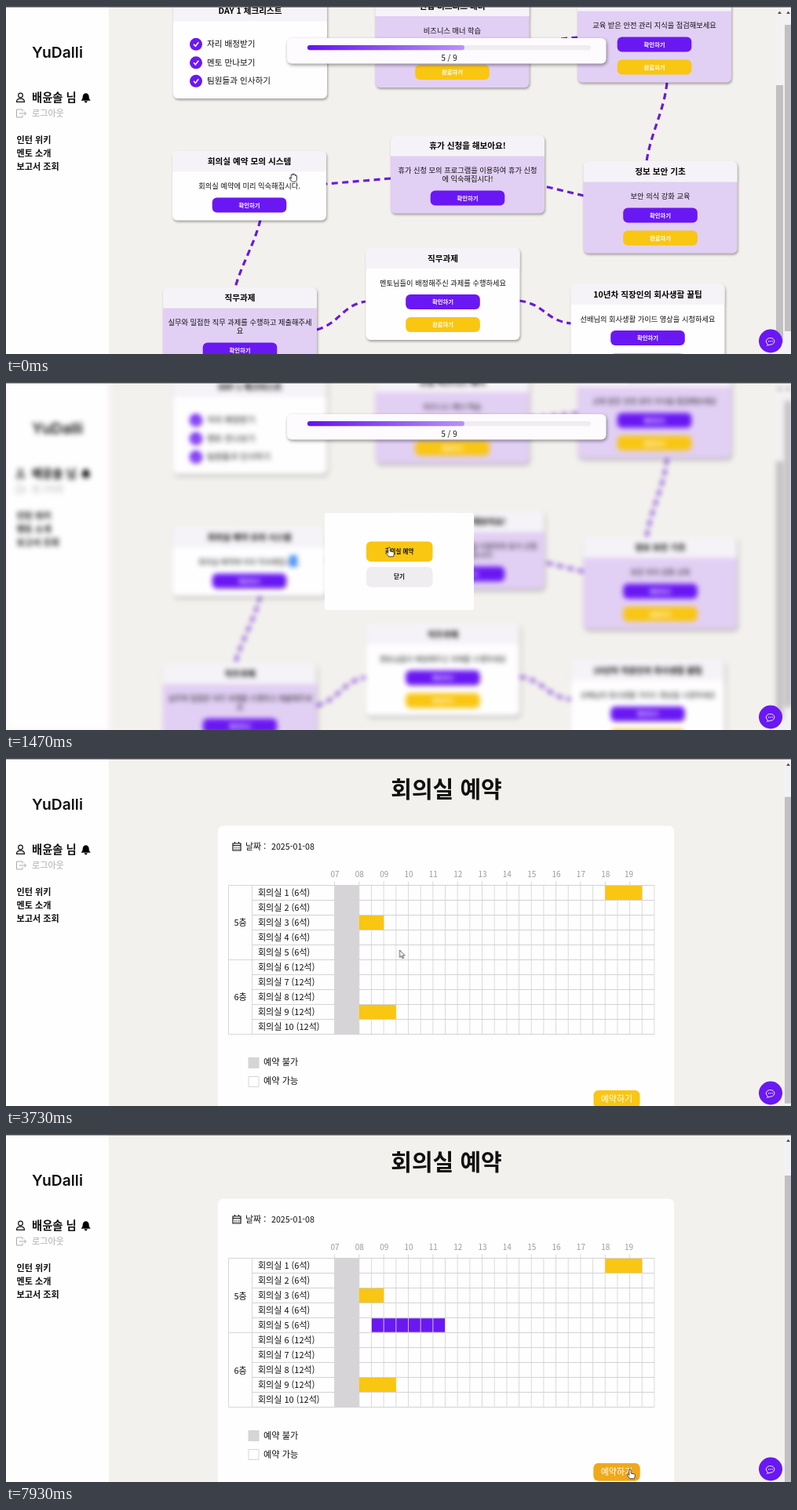
An HTML page that plays this animation: 1000 px wide and 444 px high, repeating every 8000 ms.

```html
<!DOCTYPE html>
<html lang="ko">
<head>
<meta charset="utf-8">
<title>회의실 예약</title>
<style>
html, body { margin: 0; width: 100%; height: 100%; overflow: hidden; background: #f3f1ed; }
svg { display: block; width: 100%; height: 100%; font-family: "Noto Sans CJK KR", "Noto Sans KR", sans-serif; }
.logo { font-family: Inter, sans-serif; }
.card { filter: drop-shadow(1px 2px 1.5px #0005); }
.panel { filter: drop-shadow(1px 2px 2px #0006); }
.calendar text { font-family: "Noto Sans", sans-serif; }

.step { animation: 8s step-end infinite; }
.home { animation-name: home; }
.booking { animation-name: booking; }
.blurred { animation-name: blurred; }
.modal { animation-name: modal; }
.press { animation-name: press; }
.hint { animation-name: hint; }
.date { animation-name: date; }
.day { animation-name: day; }
.hover { animation-name: hover; }
.grab { animation-name: grab; }
.hand { animation-name: hand; }
.arrow { animation-name: arrow; }
.scroll { animation: scroll 8s linear infinite; }
.thumb { animation: thumb 8s linear infinite; }
.calendar { animation: calendar 8s linear infinite; }
.picked { transform-origin: 465.5px 0; animation: picked 8s step-end infinite; }
.cursor { animation: cursor 8s ease-in-out infinite; }

@keyframes home { 0% { visibility: visible } 20%, to { visibility: hidden } }
@keyframes booking { 0% { visibility: hidden } 20%, to { visibility: visible } }
@keyframes blurred { 0% { filter: none } 7.5%, to { filter: blur(3px) } }
@keyframes modal { 0%, 20%, to { visibility: hidden } 7.5% { visibility: visible } }
@keyframes press { 0%, 13%, to { visibility: hidden } 5% { visibility: visible } }
@keyframes hint { 0%, 40%, to { visibility: hidden } 20% { visibility: visible } }
@keyframes date { 0% { visibility: hidden } 40%, to { visibility: visible } }
@keyframes day { 0%, 40%, to { visibility: hidden } 34% { visibility: visible } }
@keyframes hover { 0% { visibility: hidden } 90%, to { visibility: visible } }
@keyframes grab { 0%, 9.75% { visibility: visible } 5%, 14.4%, to { visibility: hidden } }
@keyframes hand {
  0%, 9.75%, 20%, 41%, 86.5% { visibility: hidden }
  5%, 14.4%, 32.5%, 49.5%, 89.5%, to { visibility: visible }
}
@keyframes arrow {
  0%, 32.5%, 49.5%, 89.5%, to { visibility: hidden }
  20%, 41%, 86.5% { visibility: visible }
}
@keyframes scroll {
  0%, 44.375% { transform: none; animation-timing-function: cubic-bezier(.33, 1, .68, 1) }
  48.75%, to { transform: translateY(-34.5px) }
}
@keyframes thumb {
  0%, 44.375% { transform: none; animation-timing-function: cubic-bezier(.33, 1, .68, 1) }
  48.75%, to { transform: translateY(29px) }
}
@keyframes calendar {
  0%, 28.125% { opacity: 0; transform: translateY(-16px); animation-timing-function: cubic-bezier(.23, 1, .32, 1) }
  31.875% { opacity: 1; transform: translateY(4px) }
  39.99% { opacity: 1; transform: translateY(4px); animation-timing-function: step-end }
  40%, to { opacity: 0; transform: translateY(4px) }
}
@keyframes picked {
  0% { transform: scaleX(0) }
  70% { transform: scaleX(.16667); animation-timing-function: steps(5, end) }
  76.875%, to { transform: none }
}
@keyframes cursor {
  0%, 1% { transform: translate(366px, 219px) }
  5%, 8% { transform: translate(322px, 251px) }
  11.625% { transform: translate(401px, 237px) }
  16%, 20.5% { transform: translate(488px, 211px) }
  27%, 30.5% { transform: translate(376px, 138px) }
  36%, 40.5% { transform: translate(432px, 228px) }
  44%, 56% { transform: translate(501.5px, 245px) }
  61% { transform: translate(537px, 242px) }
  67.5% { transform: translate(480.5px, 244px) }
  70% { transform: translate(473px, 244px); animation-timing-function: linear }
  76.875%, 80% { transform: translate(551px, 244px) }
  86.5% { transform: translate(757px, 376px) }
  90.5%, to { transform: translate(795px, 428px) }
}
</style>
</head>
<body>
<svg id="stage" viewBox="0 0 1000 444" preserveAspectRatio="none"></svg>
<script>
const PURPLE = '#6a18f3', YELLOW = '#f9c612', LINE = '#d9d6d9';
const range = n => [...Array(n).keys()];
const rect = (x, y, w, h, fill, r = 0, attrs = '') =>
  `<rect x="${x}" y="${y}" width="${w}" height="${h}" rx="${r}" fill="${fill}" ${attrs}/>`;
const text = (x, y, s, size, fill = '#111', attrs = '') =>
  `<text x="${x}" y="${y}" font-size="${size}" fill="${fill}" ${attrs}>${s}</text>`;
const mid = (x, y, s, size, fill, weight = 400) =>
  text(x, y, s, size, fill, `text-anchor="middle" font-weight="${weight}"`);
const path = (d, stroke, width = 1, fill = 'none', attrs = '') =>
  `<path d="${d}" stroke="${stroke}" stroke-width="${width}" fill="${fill}" ${attrs}/>`;
const group = (cls, ...parts) => `<g class="${cls}">${parts.flat().join('')}</g>`;

const sidebar = rect(0, 0, 131, 444, '#fffeff')
  + text(65.5, 66, 'YuDalli', 19.3, '#111', 'class="logo" text-anchor="middle" font-weight="600"')
  + '<circle cx="18.5" cy="114" r="2.8" fill="none" stroke="#111" stroke-width="1.2"/>'
  + path('M13.5 122.3c0-5.6 10-5.6 10 0z', '#111', 1.2)
  + text(33, 121.5, '배윤솔 님', 14.3, '#111', 'font-weight="700"')
  + path('M96 120.5c2-2 1.7-3.5 2-5.5.3-2.400 2-3.500 3.700-3.500s3.400 1.100 3.700 3.500c.3 2 0 3.500 2 5.500zM100 121.500h3.400a1.700 1.700 0 0 1-3.400 0z', '#000', .4, '#000')
  + path('M21 134.500v-2.500h-7.500v10h7.500v-2.500M17 137h8.500m-2.500-2.500l2.500 2.500-2.500 2.500', '#aaa')
  + text(33, 141, '로그아웃', 11.1, '#aaa')
  + ['인턴 위키', '멘토 소개', '보고서 조회']
      .map((s, i) => text(13.5, 175.3 + 17 * i, s, 11.1, '#111', 'font-weight="600"')).join('');

const button = (cx, y, label, fill) =>
  rect(cx - 47.3, y, 94.6, 19, fill, 6) + mid(cx, y + 12.3, label, 7.4, '#fff', 700);

const frame = (x, y, h, title, tint) =>
  rect(x, y, 196, h, tint ? '#e2cff4' : '#fffeff', 6)
  + path(`M${x} ${y + 26.5}v-20.500a6 6 0 0 1 6-6h184a6 6 0 0 1 6 6v20.500z`, 'none', 0, '#f5f3f7')
  + mid(x + 98, y + 17, title, 10.6, '#000', 700);

function card(x, y, title, lines, tint, done) {
  const cx = x + 98, top = y + 48.5 + 11 * lines.length;
  return group('card',
    frame(x, y, top - y + (done ? 58 : 29), title, tint),
    lines.map((s, i) => mid(cx, y + 48.3 + 10.5 * i, s, 9.25)),
    button(cx, top, '확인하기', PURPLE),
    done ? button(cx, top + 29, '완료하기', YELLOW) : '');
}

const checklist = group('card', frame(213, -7, 125, 'DAY 1 체크리스트', false),
  ['자리 배정받기', '멘토 만나보기', '팀원들과 인사하기'].map((s, i) => {
    const y = 48.8 + 23.5 * i;
    return `<circle cx="242" cy="${y}" r="8" fill="${PURPLE}"/>`
      + path(`M239 ${y}l2.300 2.500 4-5`, '#fff', 1.5) + text(256, y + 3.6, s, 10.6);
  }));

const links = path('M667 46C690 46 705 41 728 40M842 98C838 135 822 160 816 198M736 242L686 230'
  + 'M490 220L408 227M324 273C316 305 300 330 292 359M396 413C425 405 428 382 458 377'
  + 'M654 376C686 380 688 402 720 405', '#6a1bd9', 3.2, 'none', 'stroke-dasharray="8 5.5"');

const bar = (x, y, h, cls = '') => rect(x, 2, 9, 442, '#f3f2f3')
  + path(`M${x + 2} 10l2.500-3.500 2.500 3.500z`, 'none', 0, '#555')
  + rect(x, y, 9, h, '#c1bfc1', 0, `class="${cls}"`);

const home = group('step home', group('step blurred',
  rect(131, 0, 869, 444, '#f3f1ed'), sidebar, links, checklist,
  card(470.5, -13.5, '신입 비즈니스 매너', ['비즈니스 매너 학습'], true, true),
  card(728, -20, '안전 관리 교육', ['교육 받은 안전 관리 지식을 점검해보세요'], true, true),
  card(212, 185, '회의실 예약 모의 시스템', ['회의실 예약에 미리 익숙해집시다.'], false, false),
  card(490, 165, '휴가 신청을 해보아요!', ['휴가 신청 모의 프로그램을 이용하여 휴가 신청', '에 익숙해집시다!'], true, false),
  card(735.5, 198, '정보 보안 기초', ['보안 의식 강화 교육'], true, true),
  card(200, 359, '직무과제', ['실무와 밀접한 직무 과제를 수행하고 제출해주세', '요'], true, false),
  card(458.5, 308.5, '직무과제', ['멘토님들이 배정해주신 과제를 수행하세요'], false, true),
  card(719.5, 354.5, '10년차 직장인의 회사생활 꿀팁', ['선배님의 회사생활 가이드 영상을 시청하세요'], false, true),
  rect(262.7, 244.5, 94.6, 19, '#0002', 6, 'class="step press"'),
  rect(361, 221, 10, 15, '#4d94f5', 0, 'class="step modal"'),
  bar(981, 101, 329), bar(992, 24, 391)),
  group('panel', rect(358, 41, 406.5, 32.5, '#fdfbfe', 6)),
  rect(384, 50, 361, 6.3, '#efedf0', 3), rect(384, 50, 200, 6.3, 'url(#progress)', 3),
  mid(564.5, 70, '5 / 9', 9.8));

const modal = group('step modal', rect(406, 167, 190, 124, '#fffeff', 3),
  rect(459, 203.5, 84.5, 25.7, YELLOW, 6), mid(501, 219, '회의실 예약', 7.5, '#111', 700),
  rect(459, 236, 84.5, 25.7, '#efedef', 6), mid(501, 251.3, '닫기', 7.5, '#111', 700));

// Timetable: 26 half-hour columns from 07:00, ten rooms on two floors.
const LEFT = 418.5, TOP = 193, COL = 15.67, ROW = 19;
const col = i => LEFT + COL * i, row = i => TOP + ROW * i;
const block = (room, from, to, fill, attrs) =>
  rect(col(from), row(room) + .5, COL * (to - from), ROW - 1, fill, 0, attrs);

const timetable = [
  range(13).map(i => mid(col(2 * i) + (i > 11 ? -1 : .5), 182.3, String(i + 7).padStart(2, '0'), 10, '#999')),
  path(range(13).map(i => `M${col(2 * i)} ${TOP - 5}v5`).join(''), LINE),
  block(4, 3, 9, PURPLE, 'class="picked"'),
  path(range(27).map(i => `M${col(i)} ${TOP}v${ROW * 10}`).join(''), LINE, .9),
  path(range(11).map(i => `M313.500 ${row(i)}H826`).join(''), '#d0cdd0', .9),
  path(`M283.500 ${TOP}h30v190h-30zM283.500 ${row(5)}h30`, LINE),
  rect(LEFT, TOP, COL * 2, ROW * 10, '#d6d4d6'),
  block(0, 22, 25, YELLOW), block(2, 2, 4, YELLOW), block(8, 2, 5, YELLOW),
  range(10).map(i => text(321, row(i) + 13.5, `회의실 ${i + 1} (${i < 5 ? 6 : 12}석)`, 11)),
  mid(298.5, 245, '5층', 11), mid(298.5, 340, '6층', 11)
].flat();

const dayX = i => 345.7 + 28.7 * (i % 7), dayY = i => 201 + 25.3 * Math.floor(i / 7);
const dayLabel = i => i < 3 ? 29 + i : i < 34 ? i - 2 : i - 33;
const calendar = group('calendar',
  group('card', rect(331, 147, 202, 193.5, '#fffeff', 3)),
  path('M345 156l-4.500 4.500 4.500 4.500M519 156l4.500 4.500-4.500 4.500', '#555'),
  text(379, 165, 'January', 11.5, '#444'), path('M442.500 159l2.500 2.800 2.500-2.800', '#333', 1.3),
  text(453.5, 165, '2025', 11.5, '#444'),
  ['Sun', 'Mon', 'Tue', 'Wed', 'Thu', 'Fri', 'Sat'].map((s, i) => mid(dayX(i), 181.5, s, 7.4, '#555', 700)),
  `<circle cx="${dayX(5)}" cy="201" r="12.500" fill="none" stroke="#959ea9" stroke-width=".9"/>`,
  `<circle class="step day" cx="${dayX(10)}" cy="${dayY(10)}" r="12.500" fill="#e6e6e6"/>`,
  range(42).map(i => mid(dayX(i), dayY(i) + 3.3, dayLabel(i), 9, i < 3 || i > 33 ? '#c9c9c9' : '#444')));

const booking = group('step booking', rect(131, 0, 869, 444, '#f3f1ed'),
  group('scroll',
    mid(561, 81.7, '회의실 예약', 29, '#111', 700),
    rect(270, 117, 581, 400, '#fffeff', 7),
    path('M289 139.500h10v9h-10zM289 142h10M291.500 137.500v2.500m5-2.500v2.500', '#111', 1.2),
    path('M291 144.500h6.500m-6.500 2.200h6.500', '#111', 1, 'none', 'stroke-dasharray="1.300 1.200"'),
    text(305, 147.3, '날짜 :', 11),
    text(338, 147.3, '날짜를 선택하세요', 11.2, '#777', 'class="step hint"'),
    text(338, 147.3, '2025-01-08', 10.7, '#111', 'class="step date"'),
    timetable,
    rect(308.5, 412.5, 14, 14, '#d6d4d6'), text(328, 423, '예약 불가', 11.2),
    rect(309, 437, 13, 13, '#fff', 0, `stroke="${LINE}"`), text(328, 447, '예약 가능', 11.2),
    rect(748.5, 454.5, 59, 22.5, YELLOW, 6),
    rect(748.5, 454.5, 59, 22.5, '#f0a81c', 6, 'class="step hover"'),
    mid(778, 469.7, '예약하기', 11, '#fff')),
  sidebar, bar(992, 24, 391, 'thumb'));

const chat = `<circle cx="974" cy="427.500" r="15" fill="${PURPLE}"/>`
  + path('M970.500 431.300a5.300 4.300 0 1 1 3.500 .8l-4.500 1z', '#fff', .9)
  + [971.7, 974, 976.3].map(x => `<circle cx="${x}" cy="427.800" r=".7" fill="#fff"/>`).join('');

const cursor = group('cursor',
  group('step grab', path('M-2.800 1.200V-3.200a.9.9 0 0 1 1.800 0v-1a.9.9 0 0 1 1.800 0v.8a.9.9 0 0 1 1.800 0v1.200a.9.9 0 0 1 1.800 0V1.500c0 2.500-1 4-3.800 4-2 0-3-.8-4-2.600L-4.800.8c-.4-1 .8-1.500 1.300-.8z', '#222', .9, '#fff')),
  group('step hand', path('M-1.200 1a1.200 1.200 0 0 1 2.400 0v4l4 .8c1 .3 1.400 1 1.200 2l-.8 4h-6l-3-4.200c-.7-1 .6-1.900 1.400-1l.8.9z', '#222', .8, '#fff')),
  group('step arrow', path('M0 0v9.500l2.200-2 1.500 3.300 1.400-.6-1.500-3.200h3z', '#333', .8, '#fff')));

document.getElementById('stage').innerHTML =
  `<defs><linearGradient id="progress"><stop stop-color="#6211f0"/><stop offset="1" stop-color="#b794f6"/></linearGradient></defs>`
  + home + modal + booking + group('step booking', calendar) + rect(0, 0, 1000, 1.6, '#4b474b') + chat + cursor;
</script>
</body>
</html>
```
